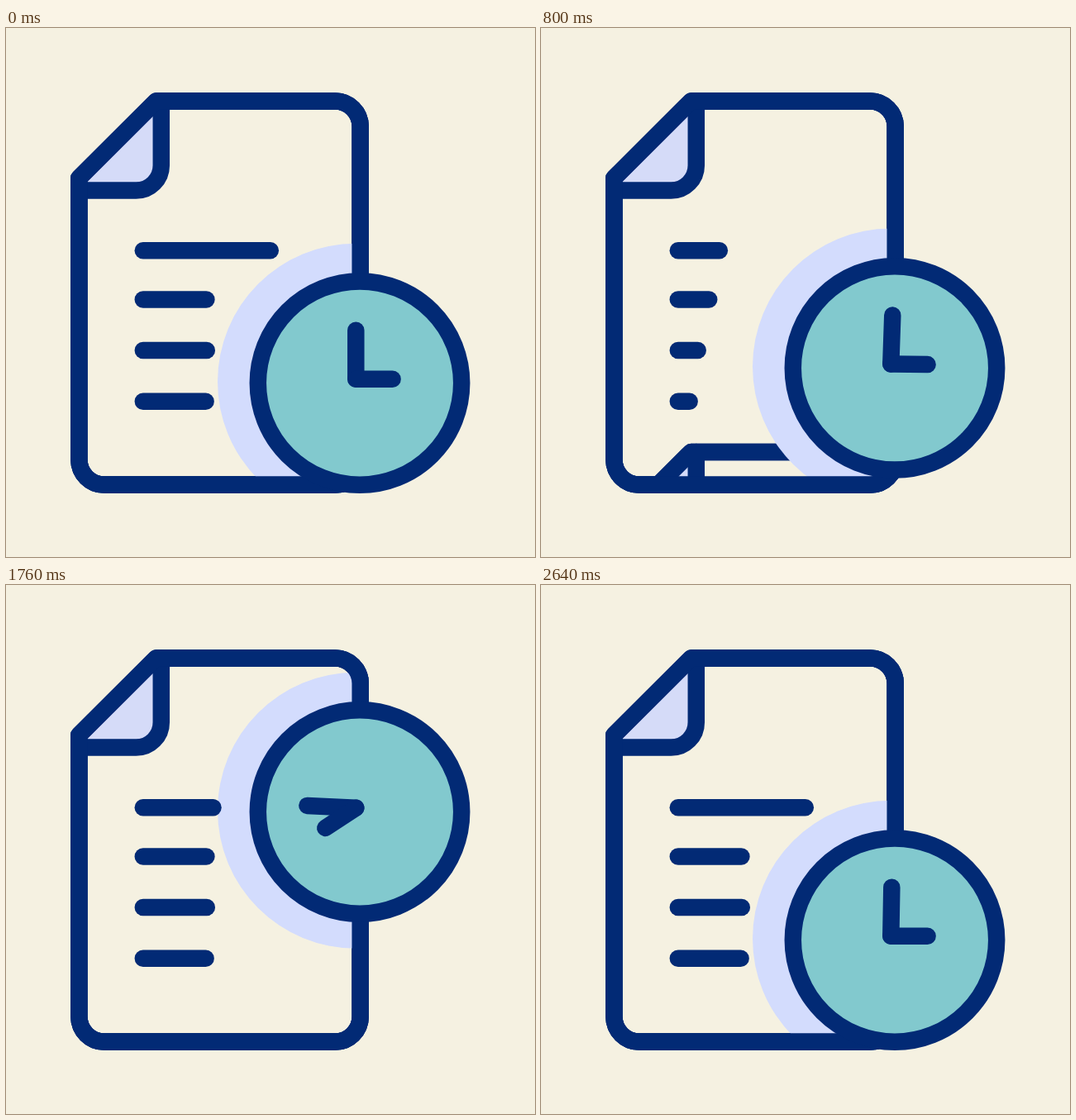
Write an HTML page that moves like this. It is 640x640 px and loops after 3 s.

```html
<!DOCTYPE html>
<html lang="en">
<head>
<meta charset="utf-8">
<title>Document and clock</title>
<style>
  html, body { margin: 0; width: 100%; height: 100%; overflow: hidden; background: #f5f1e1; }
  svg { display: block; width: 100vw; height: 100vh; }
  .ink { fill: none; stroke: #022a75; stroke-width: 20.5; stroke-linecap: round; stroke-linejoin: round; }
  .paper { fill: #f5f1e1; }
  .flap { fill: #d5dbf8; }
</style>
</head>
<body>
<svg viewBox="0 0 640 640">
  <defs>
    <path id="page" d="M88.4 181.6 181.6 88.4H398a30.7 30.7 0 0 1 30.7 30.7V522a30.6 30.6 0 0 1-30.7 30.6H119A30.6 30.6 0 0 1 88.4 522Z"/>
    <clipPath id="inside"><use href="#page"/></clipPath>
    <g id="sheet">
      <use href="#page" class="ink paper"/>
      <path class="flap" d="M88.4 181.6 181.6 88.4H187.8V166a30.4 30.4 0 0 1-30.4 30.6H88.4Z"/>
      <path class="ink" d="M88.4 196.6H157.4A30.4 30.4 0 0 0 187.8 166V88.4"/>
      <use href="#page" class="ink"/>
    </g>
  </defs>

  <use href="#sheet"/>
  <g id="below"><g id="newLines" class="ink"></g></g>
  <g clip-path="url(#inside)">
    <g id="slider">
      <use href="#sheet"/>
      <g id="oldLines" class="ink"></g>
    </g>
    <circle id="halo" cx="423" r="167" fill="#d3dcfd"/>
  </g>
  <g id="above"></g>
  <use href="#page" class="ink"/>
  <g id="clock">
    <circle class="ink" r="123.2" style="fill:#82c9ce"/>
    <g transform="translate(-4.7 -4.9)">
      <path id="minute" class="ink" d="M0 0V-59"/>
      <path id="hour" class="ink" d="M0 0V-44.3"/>
    </g>
  </g>
</svg>
<script>
const LOOP = 3000, STEP = 40, HOLD_FROM = 2640;
const LEFT = 165.8, SHORT = 77, LONG = 154;
const ROWS = [[269.3, SHORT], [328.6, 76.6], [390.1, 77], [451.8, 75.8]];
const SLIDE = 490, REST_Y = 429.6, LIFT = 155.6;

const $ = id => document.getElementById(id);

// Cubic Bezier easing from (0,0) to (1,1) with handles (a,0) and (b,1).
function ease(t, start, duration, a = 0.6, b = 0.2) {
  const x = (t - start) / duration;
  if (x <= 0) return 0;
  if (x >= 1) return 1;
  let lo = 0, hi = 1;
  for (let i = 0; i < 30; i++) {
    const s = (lo + hi) / 2, r = 1 - s;
    if (3 * r * r * s * a + 3 * r * s * s * b + s * s * s < x) lo = s; else hi = s;
  }
  return lo * lo * (3 - 2 * lo);
}

function makeLines(group) {
  return ROWS.map(() => group.appendChild(document.createElementNS("http://www.w3.org/2000/svg", "path")));
}

function setLine(path, row, length) {
  path.setAttribute("d", `M${LEFT} ${ROWS[row][0]}h${length}`);
  path.style.display = length > 0 ? "" : "none";
}

const newLines = makeLines($("newLines")), oldLines = makeLines($("oldLines"));

function draw(t) {
  const slide = ease(t, 315, 792);
  $("slider").setAttribute("transform", `translate(0 ${SLIDE * slide})`);
  $("slider").style.display = slide < 1 ? "" : "none";

  const shrink = (LONG - SHORT) * ease(t, 315, 391);
  const extend = (LONG - SHORT) * ease(t, 1510, 985);
  ROWS.forEach(([, full], i) => {
    setLine(oldLines[i], i, i ? full : LONG - shrink);
    setLine(newLines[i], i, full * ease(t, 442 + 41 * i, 752) + (i ? 0 : extend));
  });
  // Fresh lines start under the sliding sheet and end up over the halo.
  const layer = $(slide < 1 ? "below" : "above");
  if ($("newLines").parentNode !== layer) layer.append($("newLines"));

  const y = REST_Y - LIFT * (ease(t, 556, 908) - ease(t, 1706, 912));
  $("clock").setAttribute("transform", `translate(428 ${y})`);
  $("halo").setAttribute("cy", y - 1.8);
  $("minute").setAttribute("transform", `rotate(${361 * ease(t, 690, 1800, 0.5, 0.4)})`);
  $("hour").setAttribute("transform", `rotate(${90 + 360 * ease(t, 680, 1980, 0.8, 0.4)})`);
}

const origin = performance.now();
function tick() {
  const t = (performance.now() - origin) % LOOP;
  draw(Math.min(Math.floor(t / STEP) * STEP, HOLD_FROM));
  requestAnimationFrame(tick);
}
tick();
</script>
</body>
</html>
```
